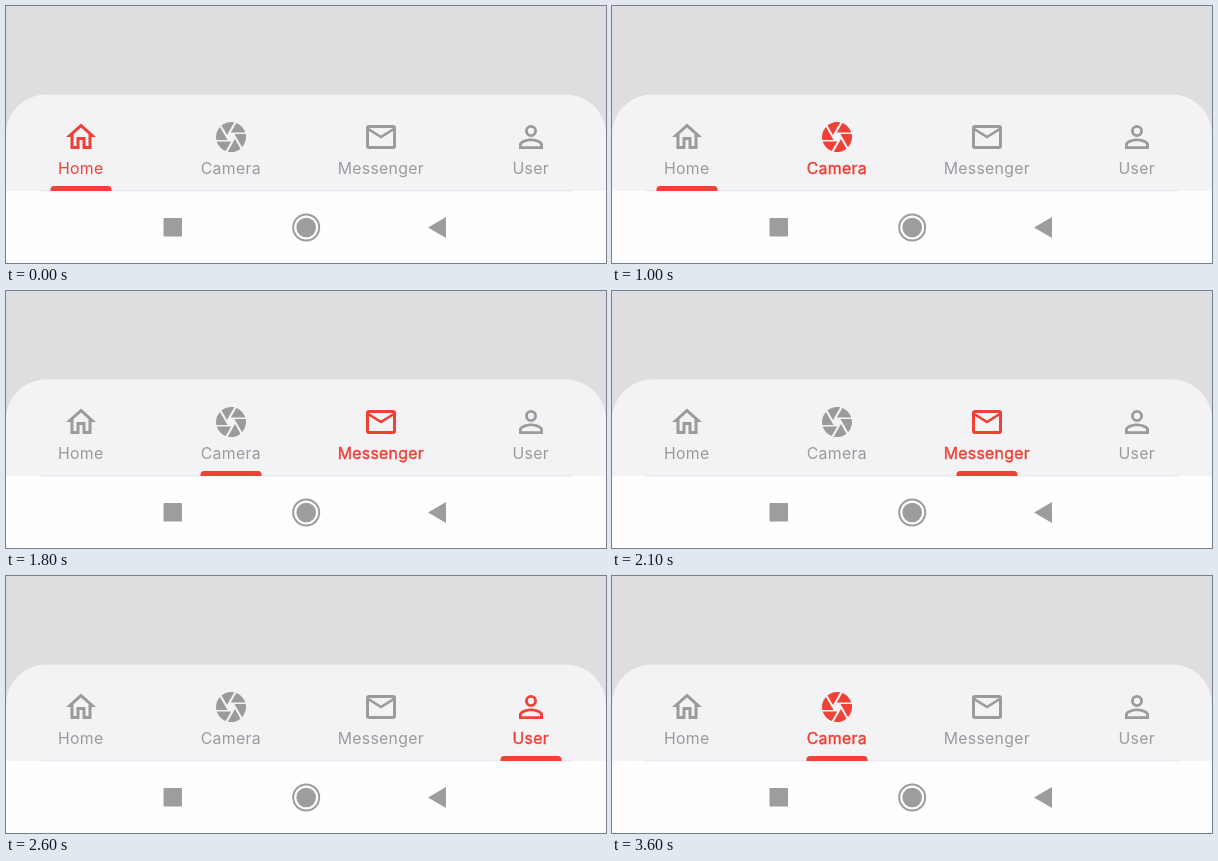
An HTML page that plays this animation: 600x257 px, repeating every 4700 ms.

```html
<!DOCTYPE html>
<html lang="en">
<head>
<meta charset="utf-8">
<title>Bottom navigation</title>
<style>
  html, body { margin: 0; width: 100%; height: 100%; overflow: hidden; background: #dedddf; }
  svg { display: block; width: 100%; height: 100%; }
  .tab { fill: #9c9a9d; stroke: #9c9a9d; stroke-width: 0; }
  .tab.on { fill: #ef4136; stroke: #ef4136; }
  .tab path { stroke: none; fill-rule: evenodd; }
  .tab text { font: 400 15.8px Inter, "Open Sans", sans-serif; letter-spacing: .3px; text-anchor: middle; }
  .system { fill: #9d9c9e; }
</style>
</head>
<body>
<svg viewBox="0 0 600 257" preserveAspectRatio="none">
  <rect width="600" height="257" fill="#dedddf"/>
  <path d="M0 185V128.500A40 40 0 0 1 40 88.500H560A40 40 0 0 1 600 128.500V185Z" fill="#f3f2f5"/>
  <rect y="185" width="600" height="72" fill="#fefdff"/>
  <rect x="34" y="184.400" width="532" height="1" fill="#e6e5e8"/>
  <g id="tabs"></g>
  <path id="bar" d="M-30.500 185V183.500a3.500 3.500 0 0 1 3.500 -3.500H27a3.500 3.500 0 0 1 3.500 3.500V185Z" fill="#ef4136"/>
  <g class="system">
    <rect x="157.500" y="212" width="18.500" height="18.500" rx="1"/>
    <circle cx="300.200" cy="221.500" r="13" fill="none" stroke="#9d9c9e" stroke-width="2"/>
    <circle cx="300.200" cy="221.500" r="9.800"/>
    <path d="M422 221.500L440 211V232Z"/>
  </g>
</svg>
<script>
const LOOP = 4700, TICK = 100;
const HOME = 0, CAMERA = 1, MAIL = 2, USER = 3;
const centre = i => 75 + 150 * i;

const tabs = [
  ['Home', 'M12 5.690l5 4.500V18h-2v-6H9v6H7v-7.810l5-4.500M12 3L2 12h3v8h6v-6h2v6h6v-8h3L12 3z'],
  ['Camera', 'M9.400 10.500l4.770-8.260C13.470 2.090 12.750 2 12 2c-2.400 0-4.600.850-6.320 2.250l3.660 6.350.060-.100z' +
    'M21.540 9c-.920-2.920-3.150-5.260-6-6.340L11.880 9h9.660z' +
    'm.260 1h-7.490l.290.500 4.760 8.250C20.980 16.970 22 14.610 22 12c0-.690-.070-1.350-.200-2z' +
    'M8.540 12l-3.900-6.750C3.010 7.030 2 9.390 2 12c0 .690.070 1.350.200 2h7.490l-1.150-2z' +
    'm-6.080 3c.920 2.920 3.150 5.260 6 6.340L12.120 15H2.460z' +
    'm11.270 0l-3.900 6.760c.700.150 1.420.240 2.170.240 2.400 0 4.600-.850 6.320-2.250l-3.660-6.350-.930 1.600z'],
  ['Messenger', 'M4 4H20a2 2 0 0 1 2 2V18a2 2 0 0 1-2 2H4a2 2 0 0 1-2-2V6a2 2 0 0 1 2-2z' +
    'M20 6l-8 5-8-5zM20 18H4V8l8 5 8-5z'],
  ['User', 'M12 4a4 4 0 0 1 0 8a4 4 0 0 1 0-8zM12 5.900a2.100 2.100 0 0 0 0 4.200a2.100 2.100 0 0 0 0-4.200z' +
    'M12 13c-2.670 0-8 1.340-8 4v3h16v-3c0-2.660-5.330-4-8-4z' +
    'M12 14.900c2.970 0 6.100 1.460 6.100 2.100v1.100H5.900V17c0-.640 3.130-2.100 6.100-2.100z']
];

// Each tap: start, travel time, tab
const taps = [
  [0, 0, HOME],
  [1000, 300, CAMERA],
  [1800, 300, MAIL],
  [2400, 200, USER],
  [3100, 200, CAMERA]
];

document.getElementById('tabs').innerHTML = tabs.map(([label, icon], i) =>
  `<g class="tab">
    <path transform="translate(${centre(i) - 18} 113) scale(1.5)" d="${icon}"/>
    <text x="${centre(i) - 0.2}" y="168.2">${label}</text>
  </g>`).join('');

const groups = [...document.querySelectorAll('.tab')];
const bar = document.getElementById('bar');
const clamp = v => Math.min(1, Math.max(0, v));
const ease = p => p * p * (3 - 2 * p);

function draw(time) {
  const t = Math.floor(time % LOOP / TICK) * TICK;
  const n = taps.findLastIndex(tap => t >= tap[0]);
  const [start, span, active] = taps[n];
  const from = n ? taps[n - 1][2] : active;
  const p = span ? ease(clamp((t - start) / span)) : 1;
  const weight = n ? 0.4 : 0.4 * clamp(t / 300);

  groups.forEach((g, i) => {
    g.classList.toggle('on', i === active);
    g.style.strokeWidth = i === active ? weight : 0;
  });
  const x = centre(from) + (centre(active) - centre(from)) * p;
  bar.setAttribute('transform', `translate(${x} 0)`);
}

function loop() {
  draw(performance.now());
  requestAnimationFrame(loop);
}
loop();
</script>
</body>
</html>
```
